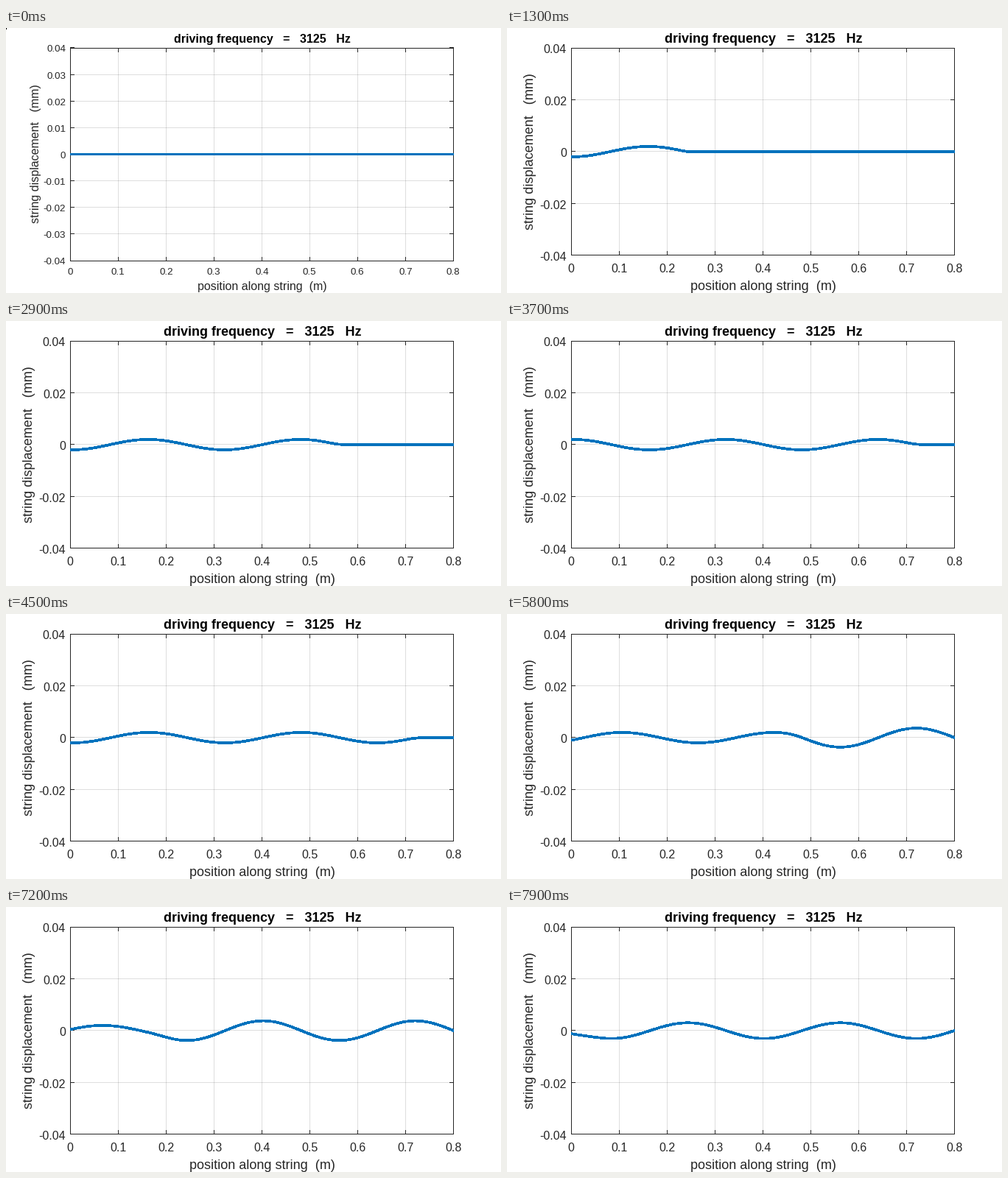
These frames come from a looping animation (672x360 px, 8000 ms). A matplotlib script:

```python
import numpy as np
import matplotlib.pyplot as plt
from matplotlib.animation import FuncAnimation
from matplotlib.patches import Polygon

W, H, DPI = 672, 360, 96
FRAMES, INTERVAL = 80, 100
PT = 72 / DPI
LEFT, RIGHT, TOP = 87, 607, 27
LENGTH, LIMIT = 0.8, 0.04
AMP, WAVELENGTH, PERIOD = 0.002, 0.318, 16
STROKE = 2 / PT
INK, BLUE = "#262626", "#0072BD"

plt.rcParams["font.family"] = "Liberation Sans"
fig = plt.figure(figsize=(W / DPI, H / DPI), dpi=DPI, facecolor="white")
ax = fig.add_axes([0, 0, 1, 1])
ax.set(xlim=(0, W), ylim=(H, 0))
ax.axis("off")


def line(xs, ys, color=INK, **kw):
    """One-pixel line through pixel centres."""
    xs, ys = np.floor(xs) + 0.5, np.floor(ys) + 0.5
    return ax.plot(xs, ys, color=color, lw=PT, snap=False,
                   solid_capstyle="projecting", **kw)[0]


def label(x, y, text, size, color=INK, ha="center", **kw):
    return ax.text(x, y, text, fontsize=size * PT, color=color, ha=ha,
                   va="baseline", **kw)


xs = np.linspace(LEFT, RIGHT + 1, 1043)
pos = (xs - LEFT - 0.5) * LENGTH / (RIGHT - LEFT)


def outline(ys):
    """Hard-edged stroke of even thickness around a curve."""
    half = STROKE / 2 * np.hypot(1, np.gradient(ys, xs))
    return np.column_stack([np.r_[xs, xs[::-1]],
                            np.r_[ys - half, (ys + half)[::-1]]])


def curve(y):
    return ax.add_patch(Polygon(outline(xs * 0 + y), fc=BLUE, lw=0,
                                ec="none", aa=False, snap=False, zorder=3))


def panel(bottom, step, tick_size, text_size, tick_base, ylabel_x):
    """Draw one version of the chart and return its artists."""
    parts = []
    mid = (LEFT + RIGHT) / 2
    for i in range(9):
        x = LEFT + (RIGHT - LEFT) * i / 8
        parts.append(label(x + 0.3, tick_base, f"{i / 10:g}", tick_size))
        if 0 < i < 8:
            parts.append(line([x, x], [TOP, bottom], alpha=0.15))
        for y0, d in ((TOP, 5), (bottom, -5)):
            parts.append(line([x, x], [y0, y0 + d]))
    for v in np.arange(-LIMIT, LIMIT + step / 2, step):
        y = TOP + (bottom - TOP) * (LIMIT - v) / (2 * LIMIT)
        text = f"{round(v, 2) + 0:g}"
        parts.append(label(81, y + 0.75 * tick_size - 4.5, text,
                           tick_size, ha="right"))
        if abs(v) < LIMIT - step / 2:
            parts.append(line([LEFT, RIGHT], [y, y], alpha=0.15))
        for x0, d in ((LEFT, 5), (RIGHT, -5)):
            parts.append(line([x0, x0 + d], [y, y]))
    parts.append(line([LEFT, RIGHT, RIGHT, LEFT, LEFT],
                      [TOP, TOP, bottom, bottom, TOP]))
    parts.append(label(mid + 1, 20, "driving frequency   =   3125   Hz",
                       text_size, "black", weight="bold"))
    parts.append(label(mid + 0.8, 356, "position along string  (m)",
                       text_size))
    parts.append(label(ylabel_x, (TOP + bottom) / 2 - 0.5,
                       "string displacement   (mm)", text_size,
                       rotation=90, rotation_mode="anchor"))
    return parts


BASE0, BASE = 316, 308.9
start = panel(BASE0, 0.01, 13.33, 16, 335, 45)
start += [curve((TOP + BASE0) / 2), line([0, 0], [0, 1], "black")]

main = panel(BASE, 0.02, 16, 18, 332, 36)
zero = (TOP + BASE) / 2
string = curve(zero)
main.append(string)


def pulse(cycles, dist):
    """Sine train whose leading edge softens as it travels."""
    soft = 0.0013 + 0.0074 * dist
    ramp = soft * np.logaddexp(0, (cycles * WAVELENGTH - dist) / soft)
    return AMP * np.sin(2 * np.pi * ramp / WAVELENGTH)


def update(n):
    for a in start:
        a.set_visible(n == 0)
    for a in main:
        a.set_visible(n > 0)
    cycles = (1.0055 * n - 1) / PERIOD
    # travelling wave plus its inverted reflection from the fixed end
    x = np.clip(pos, 0, LENGTH)
    y = pulse(cycles, x) - pulse(cycles, 2 * LENGTH - x)
    string.set_xy(outline(zero - y * (BASE - TOP) / (2 * LIMIT)))
    return start + main


anim = FuncAnimation(fig, update, frames=FRAMES, interval=INTERVAL,
                     init_func=lambda: update(0), repeat=True,
                     repeat_delay=0, blit=False)
plt.show()
```
